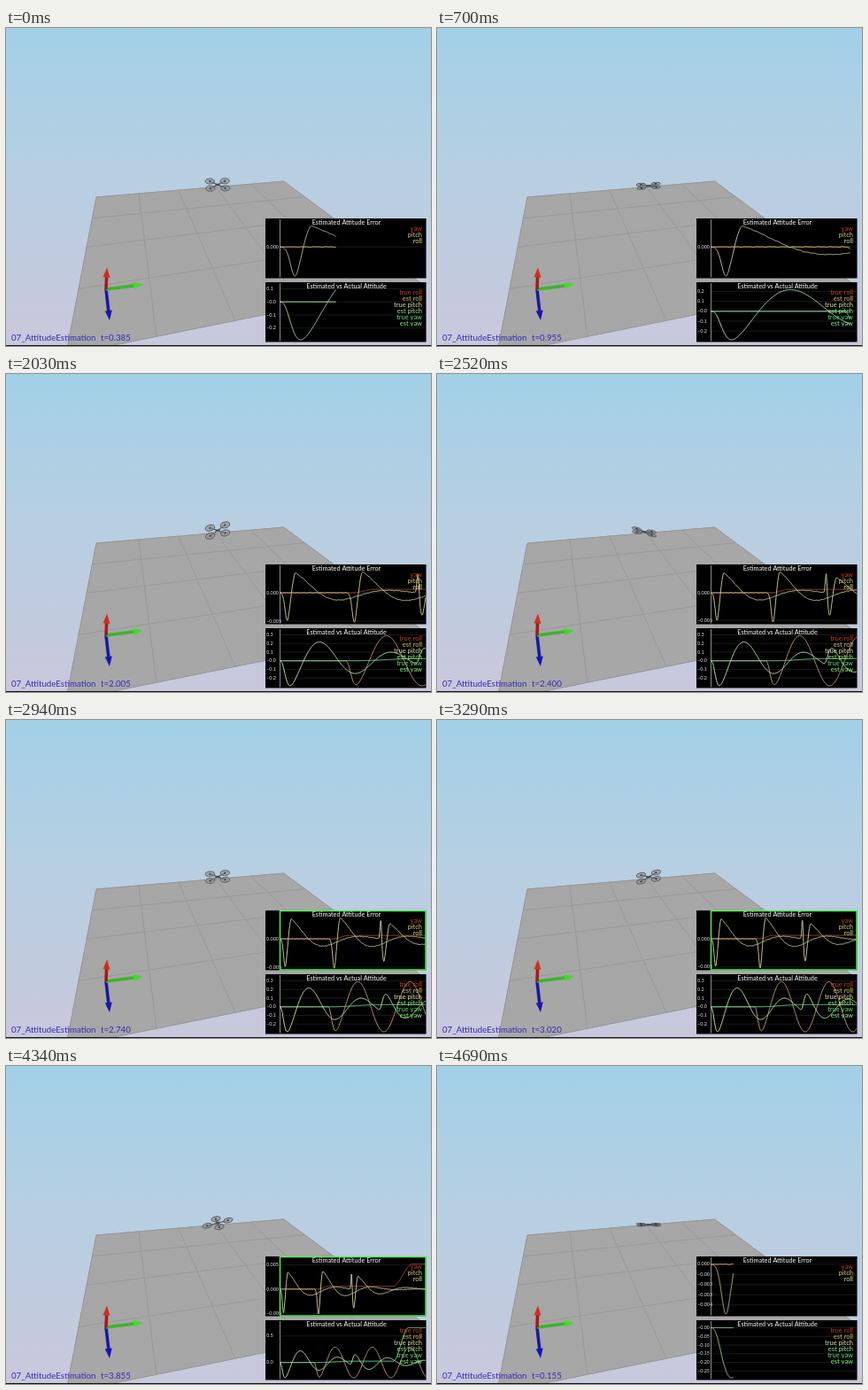
Animation, 480 px wide and 359 px high, one loop 4.76 s. Source, as an HTML page with a canvas:

```html
<!DOCTYPE html>
<html>
<head>
<meta charset="utf-8">
<style>
html, body { margin: 0; width: 100%; height: 100%; overflow: hidden; background: #c5cbdc; }
canvas { display: block; }
</style>
</head>
<body>
<canvas id="stage" width="480" height="359"></canvas>
<script>
const ctx = document.getElementById('stage').getContext('2d');
const { sin, cos, exp, max, min, PI } = Math;
const LOOP = 4760, STEP = 70, RESET = 65;

const bump = (x, center, width) => exp(-(((x - center) / width) ** 2));
function smooth(x, from, to) {
  const s = min(1, max(0, (x - from) / (to - from)));
  return s * s * (3 - 2 * s);
}

// Simulated seconds: near-constant speed with a few timing marks, then a restart.
const marks = [[0, .385], [18, 1.415], [29, 2.005], [36, 2.4], [47, 3.02], [56, 3.52]];
function clock(tick) {
  if (tick >= RESET) return .04 + .0575 * (tick - RESET);
  const i = max(1, marks.findIndex(m => m[0] > tick) + 1 || marks.length) - 1;
  const [x0, y0] = marks[i - 1], [x1, y1] = marks[i] ?? [x0 + 9, y0 + .505];
  return y0 + (y1 - y0) * (tick - x0) / (x1 - x0);
}

// Each axis is kicked at some moment, then swings, quickly at first.
const KICK_ROLL = .9, KICK_PITCH = 1.85;
const swing = (s, decay) => s <= 0 ? 0
  : sin(6.4 * s + 1.1 * (1 - exp(-s / .12))) * (1 - bump(s, 0, .08)) * exp(-decay * s);
const pitch = t => -.34 * swing(t, .8) + .25 * swing(t - KICK_PITCH, .8);
const roll = t => -.29 * swing(t - KICK_ROLL, 0);
const yaw = t => .025 * smooth(t, 1, 1.9) + .63 * smooth(t, 3, 3.4);

// The estimate lags behind a kick, overshoots and settles.
const lag = s => s <= 0 ? 0 : -.0049 * bump(s, .105, .042)
  + .0036 * smooth(s, .14, .22) * exp(-1.6 * max(0, s - .2)) * cos(4.6 * (s - .2));
const noise = (t, k) => 6e-5 * min(1, 5 * t) * sin(k * t) * sin(37 * t);
const pitchError = t => lag(t) + .8 * lag(t - KICK_PITCH) + .004 * bump(t, 1.9, .02) + noise(t, 91);
const rollError = t => 1.06 * lag(t - KICK_ROLL - .02) + noise(t, 113);
const yawError = t => .0006 * smooth(t, 1, 1.3) + .0046 * smooth(t, 3, 3.5);

const plots = [
  { title: 'Estimated Attitude Error', top: 215, bottom: 282.5, legendY: 227, digits: 3,
    lines: [[yawError, '#98462c'], [rollError, '#c4bf78'], [pitchError, '#c2c08c']],
    legend: [['yaw', '#c8401c'], ['pitch', '#d8cc5c'], ['roll', '#e0e08c']] },
  { title: 'Estimated vs Actual Attitude', top: 287, bottom: 354.5, legendY: 298.5, digits: 1, signedZero: true,
    lines: [[roll, '#bc946c'], [yaw, '#5cd48c'], [pitch, '#b0e49c']],
    legend: [['true roll', '#c8401c'], ['est roll', '#dcc454'], ['true pitch', '#e4e4a0'],
      ['est pitch', '#98f078'], ['true yaw', '#60e878'], ['est yaw', '#88f880']] },
];

function text(string, x, y, size, color, align = 'left') {
  ctx.font = `${size}px Lato, sans-serif`;
  ctx.textAlign = align;
  ctx.textBaseline = 'middle';
  ctx.fillStyle = color;
  ctx.fillText(string, x, y);
}

function path(points, color, width = 1) {
  ctx.beginPath();
  points.forEach(p => ctx.lineTo(...p));
  ctx.strokeStyle = color;
  ctx.lineWidth = width;
  ctx.stroke();
}

// Perspective of the ground: u runs along the back edge, v towards the viewer.
const COLUMNS = 5, ROWS = 4;
function ground(u, v) {
  const a = .0341 * u, b = -.1344 * v, w = 1 + a + b;
  return [(102 + 1555 * a + 131.5 * b) / w, (191 + 68 * a + 38 * b) / w];
}

function drawScene() {
  const sky = ctx.createLinearGradient(0, 0, 0, 359);
  sky.addColorStop(0, '#a2d0e7');
  sky.addColorStop(.45, '#b7cfe2');
  sky.addColorStop(1, '#c9c8dc');
  ctx.fillStyle = sky;
  ctx.fillRect(0, 0, 480, 359);

  path([[0, 0], [COLUMNS, 0], [COLUMNS, ROWS], [0, ROWS], [0, 0]].map(p => ground(...p)), '#999a9c');
  ctx.fillStyle = '#a7a7a8';
  ctx.fill();
  for (let i = 0; i <= COLUMNS; i++) path([ground(i, 0), ground(i, ROWS)], '#98989a');
  for (let i = 0; i <= ROWS; i++) path([ground(0, i), ground(COLUMNS, i)], '#98989a');
  path([[0, 358.5], [480, 358.5]], '#111');
}

function arrow(x, y, shaft, head) {
  const ox = 113, oy = 295, length = Math.hypot(x - ox, y - oy);
  ctx.save();
  ctx.translate(ox, oy);
  ctx.rotate(Math.atan2(y - oy, x - ox));
  path([[0, 0], [length - 9, 0]], shaft, 3.6);
  ctx.beginPath();
  ctx.moveTo(length, 0);
  ctx.lineTo(length - 11, -4);
  ctx.lineTo(length - 11, 4);
  ctx.fillStyle = head;
  ctx.fill();
  ctx.restore();
}

function drawDrone(t) {
  const height = max(.15, .5 + 1.5 * pitch(t)), turn = .75 + yaw(t);
  ctx.save();
  ctx.transform(1, .7 * roll(t), 0, 1, 239 - 18 * max(0, roll(t)), 177.5 - 6 * pitch(t));
  const rotors = [0, 1, 2, 3].map(i => {
    const angle = turn + i * PI / 2;
    return [12 * cos(angle), 9 * height * sin(angle)];
  });
  for (const i of [0, 1]) path([rotors[i], rotors[i + 2]], '#54565a', 1.2);
  for (const [x, y] of rotors) {
    ctx.beginPath();
    ctx.ellipse(x, y, 5.2, 4.8 * height, 0, 0, 7);
    ctx.fillStyle = 'rgba(140,142,146,.6)';
    ctx.fill();
    ctx.strokeStyle = '#55575b';
    ctx.lineWidth = .9;
    ctx.stroke();
    ctx.fillStyle = '#333';
    ctx.fillRect(x - 1, y - .8, 2, 1.6);
  }
  ctx.fillStyle = '#4a4c50';
  ctx.fillRect(-2.5, -1.2, 5, 2.4);
  ctx.restore();
}

// Smallest step of the form 1 or 5 times a power of ten that needs few ticks.
function tickStep(range) {
  let step = 10 ** Math.floor(Math.log10(range / 7));
  for (let grow = 5; range / step > 7; grow = 7 - grow) step *= grow;
  return step;
}

function drawPlot(plot, t, selected) {
  const { top, bottom } = plot, left = 309, count = 330;
  const traces = plot.lines.map(([f]) => Array.from({ length: count + 1 }, (_, i) => f(t * i / count)));
  const values = traces.flat(), high = max(...values), range = max(high - min(...values), 1e-5);
  const toY = v => top + 8.5 + (high - v) / range * 56.5;

  ctx.fillStyle = '#000';
  ctx.fillRect(293, top, 181.5, bottom - top);

  const step = tickStep(range), digits = max(plot.digits, Math.ceil(-Math.log10(step) - 1e-6));
  for (let n = -8; n <= 8; n++) {
    const y = toY(n * step);
    if (y < top + 1.5 || y > top + 64.5) continue;
    path([[left, y], [474, y]], '#1a1a1a');
    const minus = n < 0 || !n && plot.signedZero && step < .45 ? '−' : '';
    text(minus + Math.abs(n * step).toFixed(digits), 294, y, 5.5, '#e4e4e4');
  }
  path([[left + .5, top + 1], [left + .5, bottom - 1]], '#8c8c8c');

  const width = 165 * min(1, t);
  traces.forEach((trace, k) =>
    path(trace.map((v, i) => [left + width * i / count, toY(v)]), plot.lines[k][1]));

  text(plot.title, 384.5, top + 4.5, 7.27, '#fff', 'center');
  plot.legend.forEach(([name, color], i) => text(name, 470, plot.legendY + 7 * i, 7.5, color, 'right'));
  if (selected) {
    ctx.strokeStyle = '#4cf04c';
    ctx.lineWidth = 1.5;
    ctx.strokeRect(left + .5, top + .5, 164.5, bottom - top - 1);
  }
}

function draw(now) {
  const tick = Math.floor(now % LOOP / STEP);
  const t = Math.round(clock(tick) * 200) / 200;

  drawScene();
  drawDrone(t);
  arrow(117, 330, '#1a1a9c', '#1616b4');
  arrow(155, 289.5, '#3cb428', '#46d82c');
  arrow(114, 270.5, '#a01c1c', '#cc3020');
  text('07_AttitudeEstimation', 6, 350.5, 9.7, '#3528b8');
  text('t=' + t.toFixed(3), 107, 350.5, 9.7, '#3528b8');
  drawPlot(plots[0], t, tick >= 42 && tick < RESET);
  drawPlot(plots[1], t, false);
}

const start = performance.now();
function frame() {
  draw(performance.now() - start);
  requestAnimationFrame(frame);
}
frame();
</script>
</body>
</html>
```
